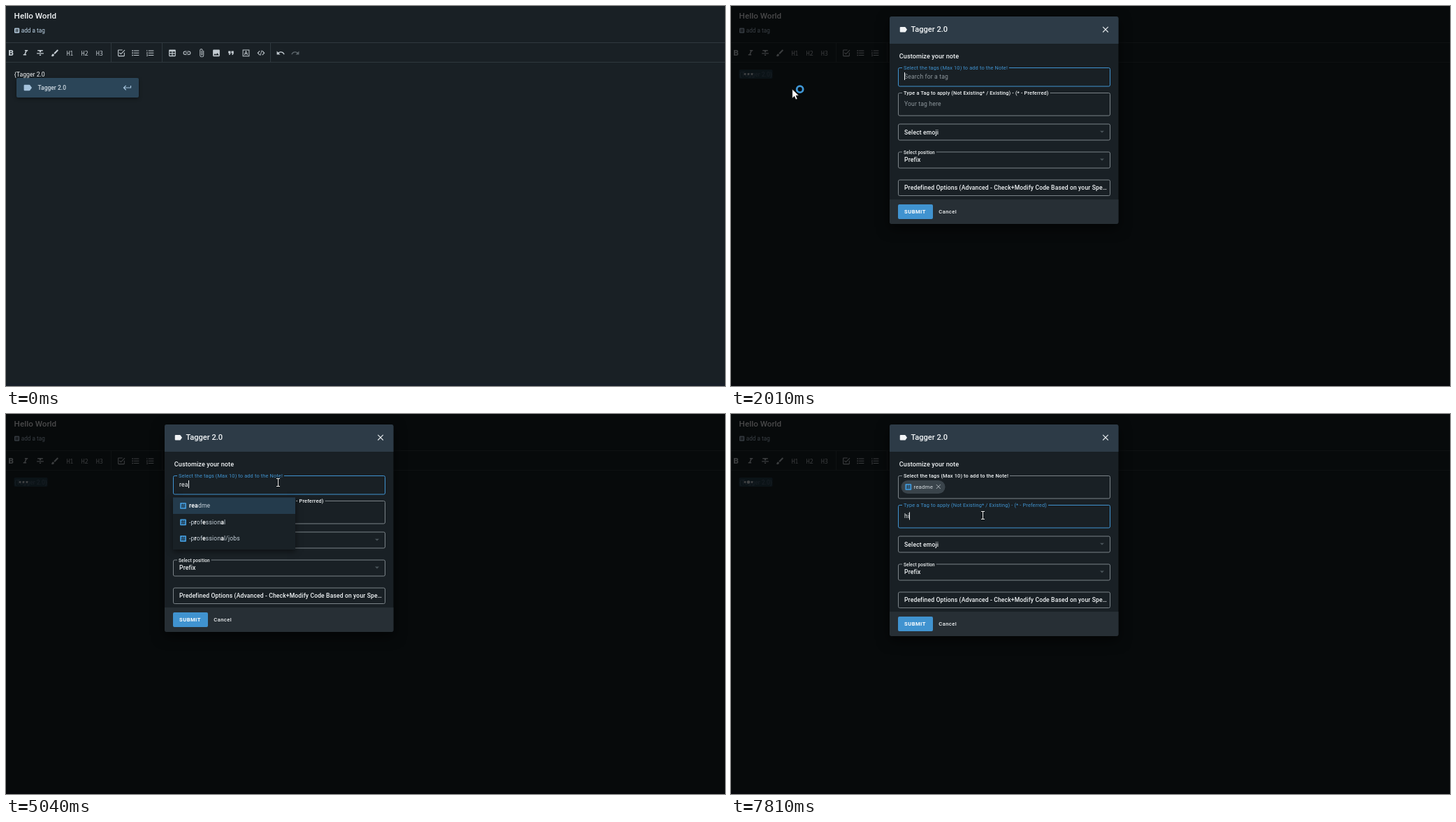
Write an HTML page with a canvas that moves like this. It is 1029 px wide and 544 px high and loops after 8 s.

```html
<!DOCTYPE html>
<html lang="en">
<head>
<meta charset="utf-8">
<title>Tagger demo</title>
<style>
html, body { margin: 0; width: 100%; height: 100%; overflow: hidden; background: #192025; }
canvas { display: block; }
</style>
</head>
<body>
<canvas id="stage" width="1029" height="544"></canvas>
<script>
const ctx = document.getElementById('stage').getContext('2d');
const LOOP = 8000;
const BG = '#192025', BLUE = '#4093d0', WHITE = '#f1f4f6', EDGE = '#7b8388';
const SANS = 'Roboto, sans-serif';

// Icons on a 24 unit grid
const LINES = 'M7 5h14v2H7zM7 11h14v2H7zM7 17h14v2H7z';
const ICONS = {
  italic: 'M10 4v3h2.2l-3.4 8H6v3h8v-3h-2.2l3.4-8H18V4z',
  strike: 'M10 19h4v-3h-4zM5 4v3h5v3h4V7h5V4zM3 14h18v-2H3z',
  brush: 'M7 14a3 3 0 0 0-3 3c0 1.3-1.2 2-2 2 .9 1.2 2.5 2 4 2a4 4 0 0 0 4-4 3 3 0 0 0-3-3zM20.7 4.6l-1.3-1.3a1 1 0 0 0-1.4 0L9 12.2 11.8 15 20.7 6a1 1 0 0 0 0-1.4z',
  check: 'M22 5.2 20.6 3.8 11 13.4 7.9 10.3 6.5 11.7 11 16.2zM19 19H5V5h10V3H5a2 2 0 0 0-2 2v14a2 2 0 0 0 2 2h14a2 2 0 0 0 2-2v-8h-2z',
  bullets: LINES + 'M2.5 4.5h3v3h-3zM2.5 10.5h3v3h-3zM2.5 16.5h3v3h-3z',
  numbers: LINES + 'M3 8h1V4H2v1h1zM2 11h1.8L2 13.1v.9h3v-1H3.2L5 10.9V10H2zM2 17h2v.5H3v1h1v.5H2v1h3v-4H2z',
  table: 'M5 3h14a2 2 0 0 1 2 2v14a2 2 0 0 1-2 2H5a2 2 0 0 1-2-2V5a2 2 0 0 1 2-2zM5 8h6v4H5zM13 8h6v4h-6zM5 14h6v4.5H5zM13 14h6v4.5h-6z',
  link: 'M3.9 12A3.1 3.1 0 0 1 7 8.9h4V7H7a5 5 0 0 0 0 10h4v-1.9H7A3.1 3.1 0 0 1 3.9 12zM8 13h8v-2H8zM17 7h-4v1.9h4a3.1 3.1 0 0 1 0 6.2h-4V17h4a5 5 0 0 0 0-10z',
  clip: 'M16.5 6v11.5a4 4 0 0 1-8 0V5a2.5 2.5 0 0 1 5 0v10.5a1 1 0 0 1-2 0V6H10v9.5a2.5 2.5 0 0 0 5 0V5a4 4 0 0 0-8 0v12.5a5.5 5.5 0 0 0 11 0V6z',
  image: 'M21 19V5a2 2 0 0 0-2-2H5a2 2 0 0 0-2 2v14a2 2 0 0 0 2 2h14a2 2 0 0 0 2-2zM8.5 13.5l2.5 3 3.5-4.5 4.5 6H5z',
  quote: 'M6 17h3l2-4V7H5v6h3zM14 17h3l2-4V7h-6v6h3z',
  letter: 'M3 3h18v18H3zM4.8 4.8v14.4h14.4V4.8zM11 7h2l4 10h-2l-.9-2.5H9.9L9 17H7zM10.6 12.8h2.8L12 8.8z',
  code: 'M9.4 16.6 4.8 12l4.6-4.6L8 6l-6 6 6 6zM14.6 16.6l4.6-4.6-4.6-4.6L16 6l6 6-6 6zM13.2 5h1.6l-4 14H9.2z',
  undo: 'M12.5 8c-2.6 0-5 1-6.9 2.6L2 7v9h9l-3.6-3.6A8 8 0 0 1 20.1 16l2.4-.8A10.5 10.5 0 0 0 12.5 8z',
  redo: 'M11.5 8c2.6 0 5 1 6.9 2.6L22 7v9h-9l3.6-3.6A8 8 0 0 0 3.9 16l-2.4-.8A10.5 10.5 0 0 1 11.5 8z',
  tag: 'M17.6 5.8A2 2 0 0 0 16 5H5a2 2 0 0 0-2 2v10a2 2 0 0 0 2 2h11a2 2 0 0 0 1.6-.8L22 12z',
  enter: 'M19 7v4H5.8l3.6-3.6L8 6l-6 6 6 6 1.4-1.4L5.8 13H21V7z'
};
for (const name in ICONS) ICONS[name] = new Path2D(ICONS[name]);
const ARROW = new Path2D('M0 0v13.2l3-2.9 2.1 4.6 2.3-1-2-4.6h4.2z');

const TOOLS = { italic: 28, strike: 49, brush: 70, check: 165, bullets: 185.5, numbers: 206.5,
  table: 238, link: 259, clip: 280, image: 301, quote: 322, letter: 343.5, code: 365, undo: 393, redo: 414 };

// Pointer stops: step, x, y
const PATH = [[0, 409, 315], [3, 90, 121], [4, 88, 119], [9, 87, 119], [13, 389, 98],
  [18, 389, 98], [20, 310, 129], [23, 310, 129], [25, 360, 145]];

function icon(name, x, y, size, color) {
  ctx.save();
  ctx.translate(x - size / 2, y - size / 2);
  ctx.scale(size / 24, size / 24);
  ctx.fillStyle = color;
  ctx.fill(ICONS[name], 'evenodd');
  ctx.restore();
}

function text(str, x, y, size, color, weight = 400, gap = 0, family = SANS) {
  ctx.font = `${weight} ${size}px ${family}`;
  ctx.letterSpacing = gap + 'px';
  ctx.fillStyle = color;
  ctx.fillText(str, x, y);
  return x + ctx.measureText(str).width;
}

function rect(x, y, w, h, color) {
  ctx.fillStyle = color;
  ctx.fillRect(x, y, w, h);
}

function round(x, y, w, h, r, color) {
  ctx.beginPath();
  ctx.roundRect(x, y, w, h, r);
  ctx.fillStyle = color;
  ctx.fill();
}

function line(color, width, ...points) {
  ctx.strokeStyle = color;
  ctx.lineWidth = width;
  ctx.beginPath();
  points.forEach(([x, y], i) => i % 2 ? ctx.lineTo(x, y) : ctx.moveTo(x, y));
  ctx.stroke();
}

function shadow(blur, dy, alpha) {
  ctx.shadowColor = `rgba(0,0,0,${alpha})`;
  ctx.shadowBlur = blur;
  ctx.shadowOffsetY = dy;
}

function cross(x, y, r, color, width) {
  line(color, width, [x - r, y - r], [x + r, y + r], [x + r, y - r], [x - r, y + r]);
}

function hash(x, y, s, color, ink) {
  round(x, y, s, s, 1.3, color);
  const a = s * .36, b = s * .64, p = s * .17, q = s * .83;
  line(ink, s * .1, [x + a + .3, y + p], [x + a - .3, y + q], [x + b + .3, y + p], [x + b - .3, y + q],
    [x + p, y + a], [x + q, y + a], [x + p, y + b], [x + q, y + b]);
}

function page(k) {
  rect(0, 0, 1029, 544, BG);
  rect(0, 540, 1029, 4, '#181f28');
  text('Hello World', 11.6, 18, 11.7, WHITE, 500);
  hash(12, 31.5, 7.2, '#b3c8da', BG);
  text('add a tag', 21.8, 38.3, 8.2, '#bdd3e6');
  const rule = '#2f383e';
  rect(0, 52, 1029, 1, rule);
  rect(0, 80, 1029, 1, rule);
  for (const x of [150, 223, 378]) rect(x, 53, 1, 27, rule);
  const ink = '#c4ccd2';
  text('B', 3.4, 71.2, 11.5, ink, 900);
  for (const name in TOOLS) icon(name, TOOLS[name], 67.3, 13, name == 'redo' ? '#5d666c' : ink);
  for (let i = 1; i < 4; i++)
    text('H' + i, 65.2 + i * 21.2, 70.6, 8.6, ink, 500, -.3, '"Noto Sans Mono", monospace');

  if (k >= 5) {
    round(11.5, 91, 48, 13, 2, '#26404f');
    text('{Tagger 2.0}', 12, 100.8, 8.7, '#50667a');
    for (let i = 0; i < 3; i++) {
      ctx.fillStyle = '#dfe6ea';
      ctx.beginPath();
      ctx.arc(20 + i * 5, 97.5, k % 6 == 5 && i == 1 ? 2.2 : 1.4, 0, 7);
      ctx.fill();
    }
    return;
  }
  text('{Tagger 2.0', 11.8, 100.8, 8.7, WHITE);
  if (k >= 0 && (k % 4 == 0 || k == 3)) rect(55.5, 93, 1, 10, WHITE);
  ctx.save();
  shadow(5, 2, .4);
  round(15, 103, 175, 28, 2, '#2b4558');
  ctx.restore();
  if (k == 4) {
    ctx.save();
    ctx.beginPath();
    ctx.rect(15, 103, 175, 28);
    ctx.clip();
    ctx.fillStyle = '#2e4f68';
    ctx.beginPath();
    ctx.arc(87.5, 119, 55, 0, 7);
    ctx.fill();
    ctx.restore();
  }
  icon('tag', 31, 117, 14.4, '#a5c3dc');
  text('Tagger 2.0', 45.6, 120, 8.5, '#cfdae3', 500);
  icon('enter', 173.7, 117, 14.5, '#a5c3dc');
}

// Outlined box with an optional label set into its top edge
function field(y, h, label, focus, size = 7.4, labelY = y + 2.6) {
  const color = focus ? BLUE : EDGE;
  ctx.strokeStyle = color;
  ctx.lineWidth = 1;
  ctx.beginPath();
  ctx.roundRect(239.5, y + .5, 303, h, 2);
  ctx.stroke();
  if (!label) return;
  const weight = focus ? 400 : 500;
  ctx.font = `${weight} ${size}px ${SANS}`;
  ctx.letterSpacing = '.14px';
  rect(245, y - 1, ctx.measureText(label).width + 4, 3, BG);
  text(label, 247, labelY, size, focus ? BLUE : WHITE, weight, .14);
}

function drop(y) {
  ctx.fillStyle = '#4b555b';
  ctx.beginPath();
  ctx.moveTo(528, y - 1.2);
  ctx.lineTo(534, y - 1.2);
  ctx.lineTo(531, y + 1.6);
  ctx.fill();
}

function menu() {
  ctx.save();
  shadow(8, 3, .5);
  rect(239, 119, 175, 75, '#192126');
  ctx.restore();
  rect(239, 119.5, 175, 23.5, '#243b4c');
  ['readme', '-professional', '-professional/jobs'].forEach((name, i) => {
    const y = 134.4 + i * 23.5;
    hash(249, y - 7.4, 9, BLUE, '#1c2a35');
    let x = 262, found = 0;
    for (const ch of name) {
      const hit = ch == 'rea'[found];
      if (hit) found++;
      x = text(ch, x, y, 8.65, hit ? WHITE : '#c3cfd8', hit ? 700 : 400, .15);
    }
  });
}

function dialog(k) {
  rect(0, 0, 1029, 544, 'rgba(0,0,0,.7)');
  const chip = k >= 21, second = k >= 26, d = chip ? 6 : 0;
  ctx.save();
  shadow(18, 6, .6);
  round(227, 15, 327.5, 297 + d, 3, BG);
  ctx.restore();
  round(227, 15, 327.5, 39, [3, 3, 0, 0], '#2d3b47');
  round(227, 277 + d, 327.5, 35, [0, 0, 3, 3], '#272f35');
  icon('tag', 246.6, 33.8, 13, WHITE);
  text('Tagger 2.0', 257.4, 37, 11.1, WHITE, 500);
  cross(536, 33.7, 3.8, '#dfe4e7', 1.2);
  text('Customize your note', 240.8, 75, 9.1, WHITE, 500, .08);

  // The first label is cut off at its top
  ctx.save();
  ctx.beginPath();
  ctx.rect(227, 86, 328, 40);
  ctx.clip();
  field(88, chip ? 32.5 : 26.5, 'Select the tags (Max 10) to add to the Note!', !second, 7.4, 91);
  ctx.restore();
  if (chip) {
    round(243.5, 95, 63, 19, 9.5, '#3a444b');
    hash(249.3, 100, 9, BLUE, '#26313a');
    text('readme', 261.6, 107.4, 7.9, '#d5dbdf', 400, .12);
    cross(296.8, 104, 3, '#a9b1b6', 1);
  } else {
    const typed = 'rea'.slice(0, Math.max(0, k - 15));
    const end = typed ? text(typed, 248, 104.2, 8.6, WHITE, 400, .15) : 248;
    if (!typed) text('Search for a tag', 248, 104.2, 8.6, '#8c959b', 400, .15);
    if (typed || k % 4 == 1 || k % 4 == 2) rect(Math.round(end), 95, 1, 11, WHITE);
  }

  ctx.save();
  ctx.translate(0, d);
  field(124, 32.5, 'Type a Tag to apply (Not Existing* / Existing) - (* - Preferred)', second);
  const word = 'hi'.slice(0, Math.max(0, k - 27));
  const end = word ? text(word, 248, 143.4, 8.6, WHITE, 400, .15) : 248;
  if (!word) text('Your tag here', 248, 143.4, 8.6, '#8c959b', 400, .15);
  if (second) rect(Math.round(end - .3), 134.5, 1, 11, WHITE);
  field(168.5, 23, '', false);
  text('Select emoji', 248, 183.6, 8.6, WHITE, 500, .13);
  drop(180);
  field(208.5, 23, 'Select position', false, 6.4, 212.2);
  text('Prefix', 248, 223.4, 8.6, WHITE, 500, .15);
  drop(219.8);
  field(248.5, 22.5, '', false);
  text('Predefined Options (Advanced - Check+Modify Code Based on your Spe…', 248, 263, 8.6, WHITE, 500, .12);
  round(239, 284, 50, 21, 2, BLUE);
  text('SUBMIT', 248, 296.9, 7.6, '#fff', 700, .48);
  text('Cancel', 297.3, 296.9, 7.6, WHITE, 500, .42);
  ctx.restore();

  if (k >= 17 && !chip) menu();
}

function place(k) {
  let i = 0;
  while (i < PATH.length - 2 && PATH[i + 1][0] <= k) i++;
  const [a, ax, ay] = PATH[i], [b, bx, by] = PATH[i + 1];
  const u = Math.min(1, (k - a) / (b - a)), e = u * u * (3 - 2 * u);
  return [ax + (bx - ax) * e, ay + (by - ay) * e];
}

function pointer(k) {
  const [x, y] = place(k);
  const beam = k < 5 || (k < 19 && x > 239) || k > 23;
  if (beam) {
    const px = Math.round(x) + .5;
    for (const [color, w] of [['rgba(0,0,0,.5)', 2.4], ['#eef0f0', 1]])
      line(color, w, [px, y - 5], [px, y + 5], [px - 2.5, y - 5.5], [px + 2.5, y - 5.5],
        [px - 2.5, y + 5.5], [px + 2.5, y + 5.5]);
    return;
  }
  ctx.save();
  ctx.translate(x, y);
  ctx.fillStyle = '#fff';
  ctx.fill(ARROW);
  ctx.strokeStyle = '#111';
  ctx.lineWidth = .7;
  ctx.stroke(ARROW);
  if (k < 8) {
    ctx.strokeStyle = '#3f97d6';
    ctx.lineWidth = 2.8;
    ctx.beginPath();
    ctx.arc(11, .2, 4.5, 0, 7);
    ctx.stroke();
  }
  ctx.restore();
}

function draw(t) {
  const k = t < 505 ? -1 : Math.floor((t - 490) / 251.7);
  page(k);
  if (k >= 6) dialog(k);
  if (k >= 0) pointer(k);
}

const start = performance.now();
function tick() {
  draw((performance.now() - start) % LOOP);
  requestAnimationFrame(tick);
}
tick();
</script>
</body>
</html>
```
